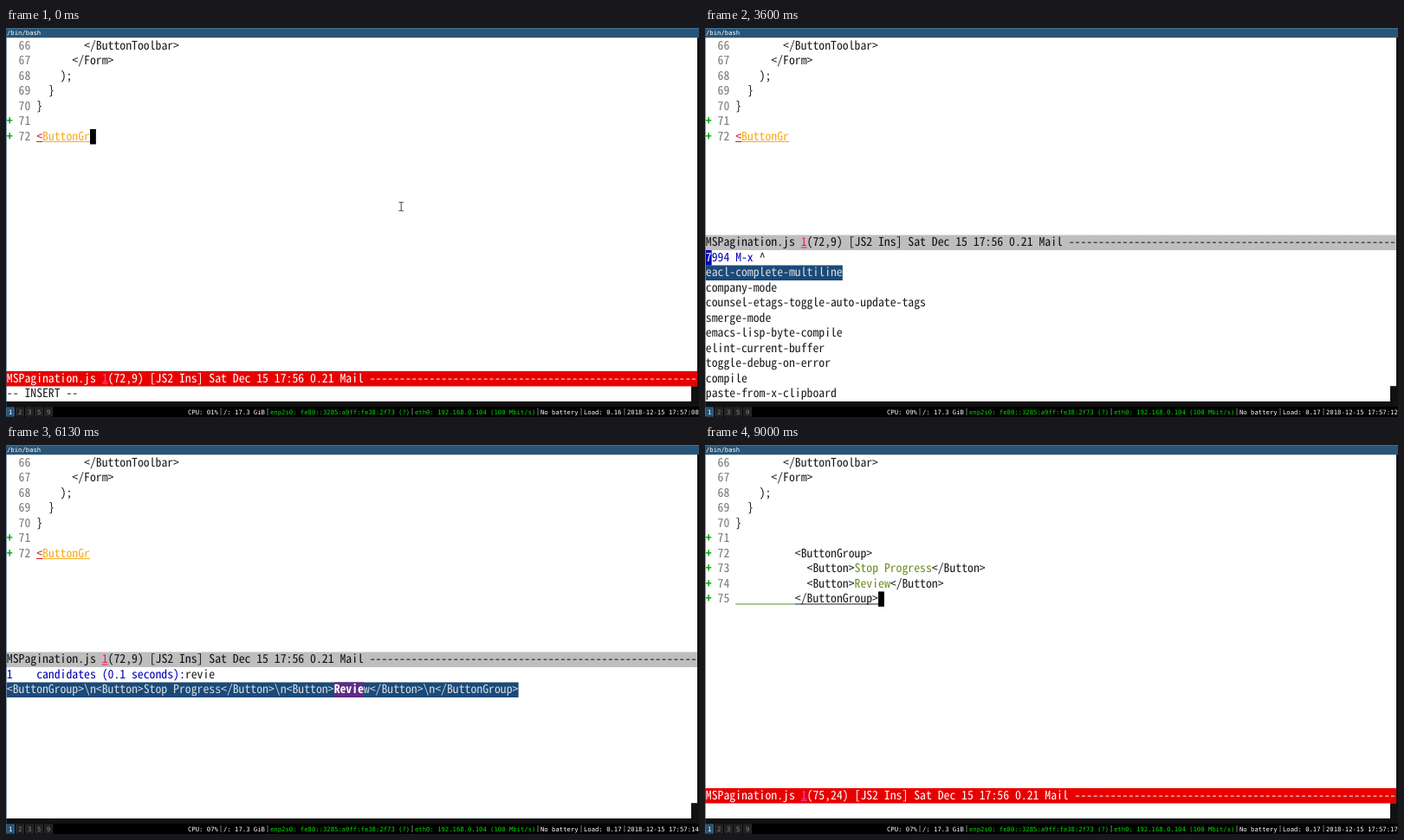
These frames come from a looping animation (800 by 450 pixels, 9140 ms). An HTML page:

```html
<!DOCTYPE html>
<html lang="en">
<head>
<meta charset="utf-8">
<title>Multiline completion</title>
<style>
html, body { margin: 0; width: 100%; height: 100%; overflow: hidden; background: #111; }
svg { display: block; width: 800px; height: 450px; }
text { white-space: pre; text-rendering: geometricPrecision; font-variant-ligatures: none; font-kerning: none; }
</style>
</head>
<body>
<svg id="stage" viewBox="0 0 800 450"></svg>
<script>
const LOOP = 9140, CELL = 6.87, ROW = 17.5, LEFT = 0.8, TOP = 12, COLS = 116;
const BLUE = '#0000b8', SELECT = '#1b4a78', FRAME = '#285577', ORANGE = '#f5ab1d', OLIVE = '#6b8e23';
const CODE_FONT = '"Noto Sans Mono CJK JP", "Noto Sans Mono", monospace';
const BAR_FONT = '"DejaVu Sans Mono", monospace';
const OPEN_MX = 2600, RUN = 3530, CANDIDATES = 3800, INSERTED = 8600;
const KEYS = [[4600, 'r'], [4730, 're'], [5000, 'rev'], [5130, 'revi'], [5330, 'revie']];

const COMMANDS = `eacl-complete-multiline
company-mode
counsel-etags-toggle-auto-update-tags
smerge-mode
emacs-lisp-byte-compile
elint-current-buffer
toggle-debug-on-error
compile
paste-from-x-clipboard`.split('\n');

const SNIPPETS = String.raw`...oup className={classNames(st.downloadStyle, 'pull-right')}>\n<DropdownButton\npullRight={true}\ntitle={<XGlyph g
...oup className={ classNames('pull-right', st.toolbarRight) }>\n<MSTweakTableViewSize onClick={this.props.toggleVi
<ButtonGroup>\n<span className={st.title}>{this.props.title}</span>\n</ButtonGroup>
<ButtonGroup>\n<XBreadcrumb\n{...this.props.breadcrumbSetup}\nclassName={st.breadcrumbStyle}\n/>\n</ButtonGroup>
<ButtonGroup>\n<Button onClick={this.showMyModal.bind(this) }>Show my modal</Button>\n</ButtonGroup>
<ButtonGroup>\n<Button>Stop Progress</Button>\n<Button>Review</Button>\n</ButtonGroup>
<ButtonGroup>\n<Button>Assign</Button>\n<Button>More</Button>\n</ButtonGroup>
...oup>\n<Button onClick={() => this.onClickHandler(1)}>Next Page <XGlyph glyph="arrow-circle-right"/></Button>\n<B
...oup>\n<FormGroup controlId={${'`${key}-page`'}}>\nPage{' '}\n<InputGroup>\n<input\ntype="number"\nstep="1"\nmin={1}\n`.split('\n');

// Font size at which one character of the family has the given width
const pen = document.createElement('canvas').getContext('2d');
function sizeFor(family, width) {
  pen.font = `100px ${family}`;
  return 100 * width / pen.measureText('0').width;
}
const codeSize = sizeFor(CODE_FONT, CELL), barSize = sizeFor(BAR_FONT, 4.36);

const escape = s => s.replace(/&/g, '&amp;').replace(/</g, '&lt;');
const rect = (x, y, w, h, fill) => `<rect x="${x}" y="${y}" width="${w}" height="${h}" fill="${fill}"/>`;
const label = (x, y, s, fill, more = '') => `<text x="${x}" y="${y}" fill="${fill}" ${more}>${escape(s)}</text>`;
const colX = col => LEFT + col * CELL;
const rowY = row => TOP + row * ROW;
const block = (col, row, n, fill) => rect(colX(col), rowY(row), n * CELL, ROW, fill);
const put = (col, row, s, fill = '#1c1c1c', more) => label(colX(col), rowY(row) + 12.7, s, fill, more);
const underline = (col, row, n, fill) => rect(colX(col), rowY(row) + 14, n * CELL, 1, fill);
const cursor = (col, row, t, since) => (t - since) % 1000 < 500 ? block(col, row, 1, '#000') : '';

function gutter(row) {
  const added = row > 4 ? put(0, row, '+', '#00a800', 'font-weight="bold"') : '';
  return added + put(2, row, String(66 + row), '#777');
}

function editor(t) {
  let out = '';
  for (let row = 0; row < (t < INSERTED ? 7 : 10); row++) out += gutter(row);
  out += put(13, 0, '</ButtonToolbar>') + put(11, 1, '</Form>') + put(9, 2, ');') + put(7, 3, '}') + put(5, 4, '}');
  if (t < INSERTED) {
    return out + put(5, 6, '<', '#e01010') + put(6, 6, 'ButtonGr', ORANGE) +
      underline(5, 6, 1, '#e01010') + underline(6, 6, 8, ORANGE) +
      (t < OPEN_MX ? cursor(14, 6, t, 0) : '');
  }
  return out + put(15, 6, '<ButtonGroup>') +
    put(17, 7, '<Button>') + put(25, 7, 'Stop Progress', OLIVE) + put(38, 7, '</Button>') +
    put(17, 8, '<Button>') + put(25, 8, 'Review', OLIVE) + put(31, 8, '</Button>') +
    put(15, 9, '</ButtonGroup>') + underline(5, 9, 10, '#4f9a20') + underline(15, 9, 14, '#1c1c1c') +
    cursor(29, 9, t, INSERTED);
}

function modeline(row, active, place) {
  const ink = active ? '#fff' : '#111', mark = active ? '#ff3ca0' : '#ff1470';
  const rest = `(${place}) [JS2 Ins] Sat Dec 15 17:56 0.21 Mail `.padEnd(COLS - 17, '-');
  return rect(0, rowY(row), 798, ROW, active ? '#e80000' : '#bebebe') +
    put(0, row, 'MSPagination.js', ink) + put(16, row, '1', mark) + underline(16, row, 1, mark) + put(17, row, rest, ink);
}

function choices(items, query) {
  return items.map((item, i) => {
    if (i) return put(0, 15 + i, item);
    let out = block(0, 15, item.length, SELECT) + put(0, 15, item, '#d4dbe2');
    if (query) {
      const at = item.toLowerCase().indexOf(query), n = query.length;
      out += block(at, 15, n, '#5f2c82') + put(at, 15, item.substr(at, n), '#fff', 'font-weight="bold"');
    }
    return out;
  }).join('');
}

function minibuffer(t) {
  if (t < CANDIDATES) {
    const running = t >= RUN;
    return put(0, 14, '7994 M-x', BLUE) + put(9, 14, '^') + choices(COMMANDS) +
      (running ? block(0, 14, 1, BLUE) + put(0, 14, '7', '#fff') : cursor(10, 14, t, OPEN_MX));
  }
  const [since, query] = KEYS.filter(k => k[0] <= t).pop() || [CANDIDATES, ''];
  const found = SNIPPETS.filter(s => s.toLowerCase().includes(query));
  const count = query ? found.length : 10;
  return put(0, 14, String(count).padEnd(5) + 'candidates (0.1 seconds):', BLUE) +
    put(30, 14, query) + choices(found, query) + cursor(30 + query.length, 14, t, since);
}

function pointer() {
  return '<path d="M453.5 201.5h2l.7 1 .7-1h2M453.5 211.5h2l.7-1 .7 1h2M456.2 202v9" fill="none" stroke="#555" stroke-width="1.1"/>';
}

function statusBar(t) {
  const tick = Math.floor((t + 830) / 1000);
  const cpu = [1, 3, 5, 7, 9, 8, 7, 7, 7, 7][tick];
  const two = n => String(n).padStart(2, '0');
  const items = [
    [210, `CPU: ${two(cpu)}%`],
    [251, '/: 17.3 GiB'],
    [305, 'enp2s0: fe80::3285:a9ff:fe38:2f73 (?)', '#00e000'],
    [472, 'eth0: 192.168.0.104 (100 Mbit/s)', '#00e000'],
    [617, 'No battery'],
    [667, `Load: 0.${tick < 4 ? 16 : 17}`],
    [717, `2018-12-15 17:57:${two(8 + tick)}`]
  ];
  let out = rect(0, 438, 800, 12, '#000');
  [...'12359'].forEach((name, i) => {
    out += rect(11 * i, 438.5, 10, 11, i ? '#333' : '#4c7899') +
      rect(11 * i + 0.5, 439, 9, 10, i ? '#222' : FRAME) +
      label(11 * i + 2.9, 446.7, name, i ? '#888' : '#fff');
  });
  items.forEach(([x, s, fill = '#fff'], i) => {
    out += label(x, 446.7, s, fill) + (i ? rect(x - 3.4, 440, 0.8, 8, '#999') : '');
  });
  return out;
}

function scene(t) {
  const prompting = t >= OPEN_MX && t < INSERTED;
  const code = editor(t) +
    modeline(prompting ? 13 : 22, !prompting, t < INSERTED ? '72,9' : '75,24') +
    (prompting ? minibuffer(t) : '') +
    (t < OPEN_MX ? put(0, 23, '-- INSERT --') + pointer() : '');
  return rect(0, 0, 800, 450, '#111') + rect(0, 0, 800, 11.2, FRAME) + rect(0, 0, 800, 0.8, '#4c7899') +
    rect(0, 11.2, 798, 403, '#fff') + rect(0, 414, 791, 18, '#fff') +
    `<g font-family='${CODE_FONT}' font-size="${codeSize}">${code}</g>` +
    rect(0, 11.2, 0.6, 426.8, FRAME) +
    `<g font-family='${BAR_FONT}' font-size="${barSize}">${label(1, 8.3, '/bin/bash', '#fff')}${statusBar(t)}</g>`;
}

const stage = document.getElementById('stage');
let shown = -1;
function frame() {
  const now = performance.now() % LOOP;
  const t = Math.min(9000, Math.floor(now / 200) * 200 + (now % 200 < 130 ? 0 : 130));
  if (t !== shown) stage.innerHTML = scene(shown = t);
  requestAnimationFrame(frame);
}
frame();
</script>
</body>
</html>
```
